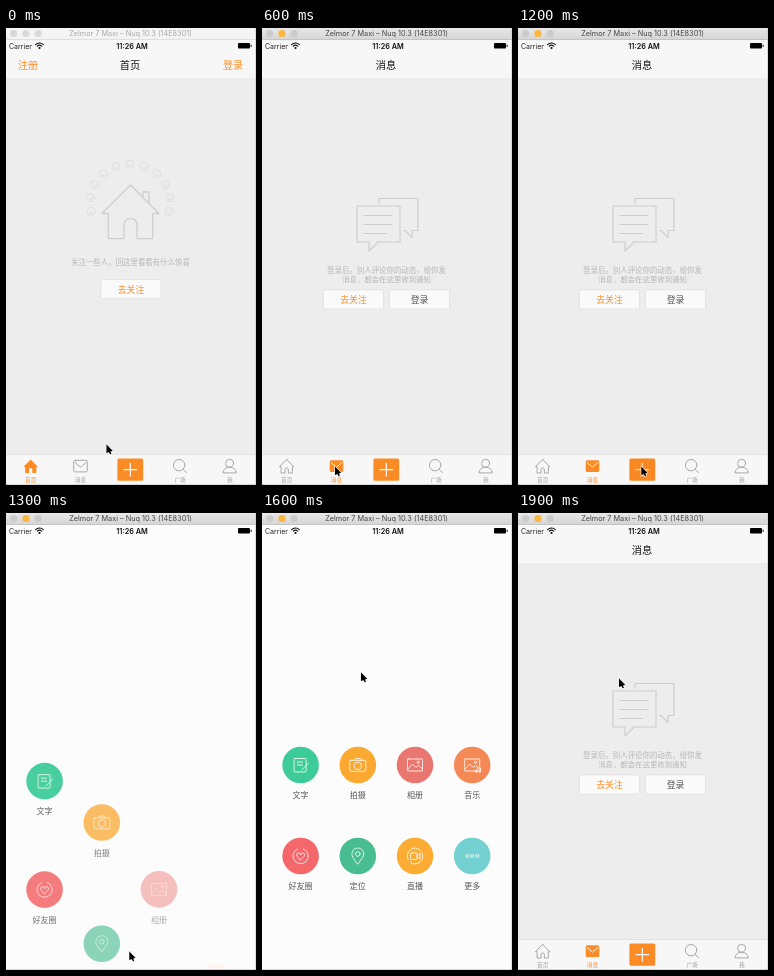
An HTML page with a canvas that plays this animation: 250 px wide and 457 px high, repeating every 2000 ms.

```html
<!DOCTYPE html>
<html lang="zh-CN">
<head>
<meta charset="utf-8">
<style>
html, body { margin: 0; width: 100%; height: 100%; overflow: hidden; background: #ededed; }
canvas { display: block; width: 250px; height: 457px; }
</style>
</head>
<body>
<canvas id="stage"></canvas>
<script>
const W = 250, H = 457, LOOP = 2000, STEP = 100, PI = Math.PI;
const ORANGE = '#fb8c25', GREY = '#a0a0a0', PALE = '#cecece', HINT = '#b6b6b6';
const PAGE = '#ededed', BAR = '#f7f7f7';
const LATIN = 'Inter, "Liberation Sans", sans-serif';
const CJK = '"Noto Sans CJK SC", "Noto Sans CJK", sans-serif';

const canvas = document.getElementById('stage');
const ctx = canvas.getContext('2d');
const dpr = window.devicePixelRatio || 1;
canvas.width = W * dpr;
canvas.height = H * dpr;

const clamp = v => Math.max(0, Math.min(1, v));
const smooth = u => u * u * (3 - 2 * u);

function rect(x, y, w, h, color) {
  ctx.fillStyle = color;
  ctx.fillRect(x, y, w, h);
}

function text(str, x, y, size, color, { align = 'center', weight = 400, font = CJK } = {}) {
  ctx.font = `${weight} ${size}px ${font}`;
  ctx.textAlign = align;
  ctx.textBaseline = 'middle';
  ctx.fillStyle = color;
  ctx.fillText(str, x, y);
}

function pen(color, width = 0.9) {
  ctx.strokeStyle = color;
  ctx.lineWidth = width;
  ctx.lineJoin = ctx.lineCap = 'round';
}

// Fills the current path when given a colour, else strokes it
function paint(fill) {
  if (!fill) return ctx.stroke();
  ctx.fillStyle = fill;
  ctx.fill();
}

function line(...points) {
  ctx.beginPath();
  points.forEach(([x, y]) => ctx.lineTo(x, y));
  ctx.stroke();
}

function ring(x, y, r, from = 0, to = 2 * PI) {
  ctx.beginPath();
  ctx.arc(x, y, r, from, to);
  ctx.stroke();
}

function disc(x, y, r, color) {
  ctx.beginPath();
  ctx.arc(x, y, r, 0, 2 * PI);
  paint(color);
}

function box(x, y, w, h, r, fill) {
  ctx.beginPath();
  ctx.roundRect(x, y, w, h, r);
  paint(fill);
}

function at(x, y, draw) {
  ctx.save();
  ctx.translate(x, y);
  draw();
  ctx.restore();
}

// Symmetric house hanging from its ridge; s is half the roof width
function house(x, y, s, fill) {
  const wall = s * 0.78, base = s * 1.88, door = s * 0.23;
  const half = [[0, 0], [s, s], [wall, s], [wall, base], [door, base]];
  at(x, y, () => {
    ctx.beginPath();
    half.forEach(([px, py]) => ctx.lineTo(px, py));
    ctx.arc(0, s * 1.4, door, 0, PI, true);
    half.reverse().forEach(([px, py]) => ctx.lineTo(-px, py));
    paint(fill);
  });
}

function bubble(x, y, w, h, tip, slant) {
  const low = y + h;
  ctx.beginPath();
  ctx.rect(x, y, w, h);
  ctx.fillStyle = PAGE;
  ctx.fill();
  line([Math.min(tip, tip + slant), low], [x, low], [x, y], [x + w, y], [x + w, low],
    [Math.max(tip, tip + slant), low]);
  line([tip, low], [tip, low + Math.abs(slant)], [tip + slant, low]);
}

function titleBar(active) {
  const g = ctx.createLinearGradient(0, 0, 0, 12);
  g.addColorStop(0, active ? '#e8e8e8' : '#f6f6f6');
  g.addColorStop(1, active ? '#d4d4d4' : '#f2f2f2');
  rect(0, 0, W, 11.5, g);
  rect(0, 11, W, 0.7, active ? '#b8b8b8' : '#d8d8d8');
  for (let i = 0; i < 3; i++) {
    const lit = active && i === 1;
    disc(7.7 + i * 12.2, 5.5, 3.6, lit ? '#fbb63c' : active ? '#cbcbcb' : '#d9d9d9');
  }
  text('Zelmor 7 Maxi – Nuq 10.3 (14E8301)', 124.5, 5.8, 7.3, active ? '#454545' : '#a9a9a9', { font: LATIN });
}

function statusBar() {
  text('Carrier', 3, 18.4, 7, '#222', { align: 'left', font: LATIN });
  text('11:26 AM', 126, 18.4, 7.3, '#111', { weight: 600, font: LATIN });
  pen('#111', 1.1);
  for (const r of [3, 5.3]) ring(33.5, 20.3, r, -PI * 0.76, -PI * 0.24);
  disc(33.5, 20, 1.1, '#111');
  box(232, 15, 12, 5.6, 1, '#000');
  rect(244.6, 16.8, 1, 2, '#000');
}

function page(title) {
  rect(0, 11, W, H, PAGE);
  rect(0, 12, W, 39, BAR);
  rect(0, 50.5, W, 0.6, '#e2e2e2');
  text(title, 124, 37, 10.2, '#111', { weight: 500 });
}

function button(label, x, y, color) {
  box(x, y, 60, 19, 1, '#fafafa');
  pen('#dfdfdf', 0.7);
  box(x, y, 60, 19, 1);
  text(label, x + 30, y + 9.8, 8.8, color);
}

function homePage() {
  page('首页');
  text('注册', 22, 37, 10, ORANGE);
  text('登录', 227, 37, 10, ORANGE);

  // faint faces around the roof
  pen('#dadada', 0.8);
  for (let i = 0; i < 11; i++) {
    const a = PI * (0.92 + i * 0.116);
    at(124 + Math.cos(a) * 40, 174 + Math.sin(a) * 38, () => {
      ring(0, 0, 4);
      ring(0, 0.4, 1.6, 0.3, 2.8);
    });
  }
  pen(PALE, 1.3);
  line([137, 170], [137, 164], [143, 164], [143, 176]);
  house(124.5, 157, 28.5, PAGE);
  house(124.5, 157, 28.5);

  text('关注一些人，回这里看看有什么惊喜', 124.5, 234.5, 7.45, HINT);
  button('去关注', 95, 251.5, ORANGE);
}

function messagePage() {
  page('消息');
  pen(PALE, 1.2);
  bubble(117, 170.5, 39, 32, 150, -7);
  rect(92, 176, 49, 41, PAGE);
  bubble(95, 178, 43, 36, 107, 9);
  for (let i = 0; i < 3; i++) line([102, 187.5 + i * 9], [i < 2 ? 130 : 124, 187.5 + i * 9]);
  text('登录后，别人评论你的动态，给你发', 124.5, 242.3, 7.45, HINT);
  text('消息，都会在这里收到通知', 124.5, 250.8, 7.4, HINT);
  button('去关注', 61.5, 262, ORANGE);
  button('登录', 127.5, 262, '#555');
}

function tabBar(selected, pressed) {
  rect(0, 426.5, W, 31, BAR);
  rect(0, 426.3, W, 0.7, '#dcdcdc');
  const tabX = i => 24.7 + i * 49.8;
  ['首页', '消息', '', '广场', '我'].forEach((label, i) =>
    text(label, tabX(i), 452.3, 5.7, i === selected ? ORANGE : GREY));

  pen(GREY);
  house(tabX(0), 431.5, 7.2, selected === 0 && ORANGE);

  at(tabX(1), 438, () => {
    const mail = selected === 1;
    box(-6.8, -5.7, 13.6, 11.6, 1.5, mail && ORANGE);
    pen(mail ? '#fff' : GREY);
    line([-5.5, -3.5], [0, 1.2], [5.5, -3.5]);
  });

  at(tabX(2), 441.7, () => {
    box(-12.9, -11.2, 25.8, 22.2, 1.5, pressed ? '#f98822' : ORANGE);
    pen(pressed ? '#ffd9b3' : '#fff', 1.2);
    line([-6.4, 0], [6.4, 0]);
    line([0, -6.4], [0, 6.4]);
  });

  pen(GREY);
  at(tabX(3), 438, () => {
    ring(-1, -0.8, 5.7);
    line([3.1, 3.3], [6.4, 6.6]);
  });

  at(tabX(4), 435.3, () => {
    ring(-0.3, 0, 4);
    ctx.beginPath();
    ctx.ellipse(-0.3, 9.2, 6.6, 5.4, 0, PI, 0);
    ctx.closePath();
    ctx.stroke();
  });
}

// Icons are drawn around (0, 0)
const icons = {
  write() {
    box(-6.5, -6.5, 12, 13.5, 1);
    for (const y of [-3, 0]) line([-3.5, y], [2, y]);
    line([1, 5], [8, -2]);
  },
  camera() {
    box(-8, -4.7, 16, 11, 1);
    line([-4, -4.7], [-2.5, -6.5], [2.5, -6.5], [4, -4.7]);
    ring(0, 0.8, 3.7);
  },
  photo() {
    box(-7.5, -6, 15, 12, 0.5);
    line([-7, 4], [-2.5, -1], [1, 2.5], [3.5, 0.5], [7, 3.5]);
    ring(3.3, -2.7, 1.2);
  },
  music() {
    icons.photo();
    for (const x of [4, 7.5]) {
      ring(x, 6.5, 0.9);
      line([x + 0.9, 6.5], [x + 0.9, 3]);
    }
  },
  friends() {
    ring(0, 0, 7.6, -1.2, 4.3);
    ctx.beginPath();
    ctx.arc(-2, -1, 2, 2.4, 0);
    ctx.arc(2, -1, 2, PI, 0.75);
    ctx.lineTo(0, 4);
    ctx.closePath();
    ctx.stroke();
  },
  place() {
    ctx.beginPath();
    ctx.arc(0, -2, 6, 2.6, 0.54);
    ctx.lineTo(0, 8);
    ctx.closePath();
    ctx.stroke();
    ring(0, -2, 2.3);
  },
  live() {
    for (const a of [-0.6, 2.6]) ring(0, 0, 7.8, a, a + 2.8);
    box(-4.5, -3, 6.5, 6.5, 1);
    line([2, -0.5], [5, -2.5], [5, 3], [2, 1]);
  },
  more() {
    for (const x of [-5, 0, 5]) ring(x, 0, 1.5);
  }
};

const items = [
  ['文字', '#3ccb99', 'write'], ['拍摄', '#fba930', 'camera'],
  ['相册', '#e97770', 'photo'], ['音乐', '#f58955', 'music'],
  ['好友圈', '#f4676a', 'friends'], ['定位', '#48bd91', 'place'],
  ['直播', '#fcac32', 'live'], ['更多', '#74d1d1', 'more']
];

// Items rise column by column and leave in reverse order
function compose(t) {
  rect(0, 11, W, H, '#fcfcfc');
  items.forEach(([label, color, icon], i) => {
    const col = i % 4, row = i >> 2, rank = col * 2 + row;
    const rise = clamp((t - 1200 - rank * 16) / 136);
    const fall = clamp((t - 1600 - (7 - rank) * 11) / 110);
    const away = (1 - rise) ** 2 + fall ** 2;
    if (away >= 1) return;
    at(38.6 + col * 57.2, 252 + row * 91 + 230 * away, () => {
      ctx.globalAlpha = 1 - away;
      disc(0, 0, 18.3, color);
      pen('#fff', 0.8);
      icons[icon]();
      text(label, 0, 30.3, 8, '#555');
    });
  });
}

// Each move: end time, position, duration
const moves = [[300, 73, 438.5, 300], [900, 123.3, 438.5, 300], [1600, 99, 159.5, 300], [1900, 101, 165.5, 100]];

function cursor(t) {
  let x = 100.5, y = 416.5;
  for (const [end, toX, toY, span] of moves) {
    const u = smooth(clamp((t - end + span) / span));
    x += (toX - x) * u;
    y += (toY - y) * u;
  }
  at(x, y, () => {
    for (const [color, extra] of [['#fff', 1.3], ['#000', 0]]) {
      pen(color, 1.6 + extra);
      line([2.4, 5.5], [4, 9]);
      ctx.beginPath();
      ctx.moveTo(0, 0);
      ctx.lineTo(0, 8.6);
      ctx.lineTo(6.1, 6.2);
      ctx.closePath();
      pen(color, extra || 0.1);
      ctx.stroke();
      paint(color);
    }
  });
}

function draw(t) {
  ctx.setTransform(dpr, 0, 0, dpr, 0, 0);
  if (t >= 1300 && t < 1900) compose(t);
  else {
    const home = t < 500;
    home ? homePage() : messagePage();
    tabBar(home ? 0 : 1, t >= 1100 && t < 1300);
  }
  statusBar();
  titleBar(t >= 300);
  rect(249.4, 0, 0.6, H, '#c9c9c9');
  rect(0, 456.4, W, 0.6, '#c4c4c4');
  cursor(t);
}

const start = performance.now();
function tick() {
  const t = (performance.now() - start) % LOOP;
  draw(Math.floor(t / STEP) * STEP);
  requestAnimationFrame(tick);
}
tick();
</script>
</body>
</html>
```
